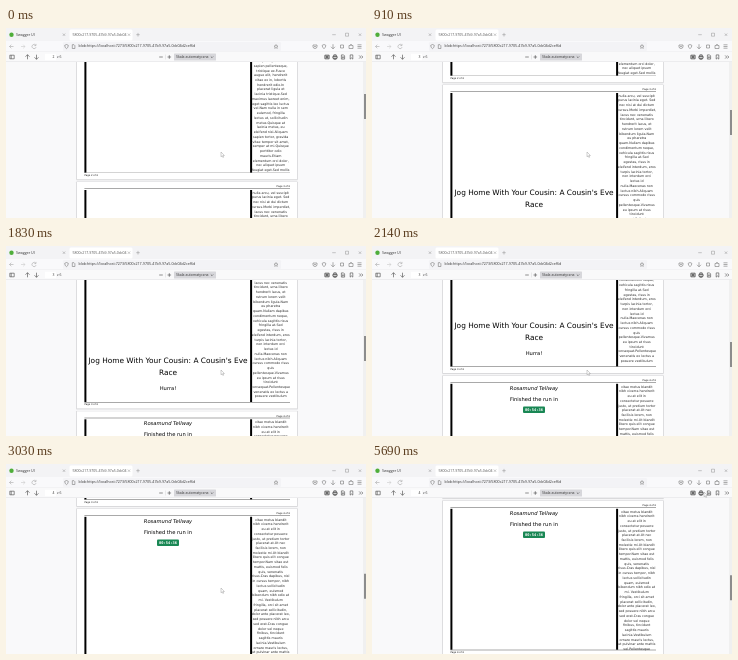
An HTML page with a canvas that plays this animation: 360x190 px, repeating every 5.79 s.

```html
<!DOCTYPE html>
<html lang="pl">
<head>
<meta charset="utf-8">
<title>PDF viewer</title>
<style>
html, body { margin: 0; width: 100%; height: 100%; overflow: hidden; background: #f9f9fb; }
canvas { display: block; width: 360px; height: 190px; }
</style>
</head>
<body>
<canvas id="stage"></canvas>
<script>
const W = 360, H = 190, LOOP = 5790, PAGE_H = 155.5, PITCH = 158.3;
const SANS = '"DejaVu Sans", sans-serif';
const UI = '"Open Sans", "Noto Sans", sans-serif';
const canvas = document.getElementById('stage');
const ctx = canvas.getContext('2d');
const ratio = window.devicePixelRatio || 1;
canvas.width = W * ratio;
canvas.height = H * ratio;

// Screen refreshes: [first, last, count]
const bursts = [
  [0, 0, 1], [50, 120, 2], [290, 410, 3], [640, 1050, 7], [1220, 1220, 1], [1420, 1420, 1],
  [1710, 1710, 1], [1830, 2140, 5], [2190, 2290, 3], [2470, 3030, 9], [3130, 3130, 1],
  [3330, 3400, 2], [3750, 4170, 6], [4390, 4960, 9], [5030, 5340, 5], [5690, 5690, 1]
];
const ticks = bursts.flatMap(([a, b, n]) =>
  Array.from({ length: n }, (_, i) => Math.round((a + (b - a) * i / Math.max(1, n - 1)) / 10) * 10));

// Rows: time, then the values at that time
const scrollKeys = [
  [0, 0], [50, 2], [120, 5], [570, 5], [910, 97], [1050, 112], [1640, 112], [1830, 147],
  [2140, 182.5], [2240, 192], [2400, 192], [3030, 267.5], [3130, 275.5]
];
const pointerKeys = [
  [0, 215, 124], [3680, 215, 124], [4170, 222, 80], [4320, 222, 80], [4960, 318, 43], [5340, 332, 28]
];

const sidebars = {
  2: `aliquam justo et|sapien pellentesque,|tristique ex.Fusce|augue elit, hendrerit|vitae ex in, lobortis|hendrerit odio.In|placerat ligula et|lacinia tristique.Sed|maximus laoreet enim,|eget sagittis leo luctus|vel.Nam nulla in sem|euismod, fringilla|lectus ut, sollicitudin|metus.Quisque at|lacinia metus, eu|eleifend nisl.Aliquam|sapien tortor, gravida|vitae tempor sit amet,|semper at mi.Quisque|porttitor odio|mauris.Etiam|elementum orci dolor,|nec aliquet ipsum|feugiat eget.Sed mollis`,
  3: `nulla arcu, vel suscipit|purus lacinia eget. Sed|nec nisi at dui dictum|cursus.Morbi imperdiet,|lacus nec venenatis|tincidunt, urna libero|hendrerit lacus, et|rutrum lorem velit|bibendum ligula.Nam|eu pharetra|quam.Nullam dapibus|condimentum neque,|vehicula sagittis risus|fringilla at.Sed|egestas, risus in|eleifend interdum, eros|turpis lacinia tortor,|non interdum orci|lectus id|nulla.Maecenas non|lectus nibh.Aliquam|cursus commodo risus|quis|pellentesque.Vivamus|eu ipsum at risus|tincidunt|consequat.Pellentesque|venenatis ex lectus a|posuere vestibulum`,
  4: `vitae metus blandit|nibh viverra hendrerit|eu at elit in|consectetur posuere|justo, ut pretium tortor|placerat at.Ut nec|facilisis lorem, non|molestie mi.Ut blandit|libero quis elit congue|tempor.Nam vitae est|mattis, euismod felis|quis, venenatis|risus.Cras dapibus, nisl|in cursus tempor, nibh|lectus sollicitudin|quam, euismod|bibendum nibh odio at|mi. Vestibulum|fringilla, orci sit amet|placerat sollicitudin,|dolor ante placerat leo,|sed posuere nibh arcu|sed erat.Cras congue|dolor vel neque|finibus, tincidunt|sagittis mauris|lacinia.Vestibulum|ornare mauris lectus,|ut pulvinar ante mattis|vel.Pellentesque`
};

function sample(keys, t) {
  const i = keys.findIndex(k => k[0] > t);
  if (i < 0) return keys[keys.length - 1].slice(1);
  const a = keys[i - 1], b = keys[i], p = (t - a[0]) / (b[0] - a[0]);
  return a.slice(1).map((v, j) => v + (b[j + 1] - v) * p);
}

function rect(x, y, w, h, fill, r = 0) {
  ctx.fillStyle = fill;
  ctx.beginPath();
  ctx.roundRect(x, y, w, h, r);
  ctx.fill();
}

function text(str, x, y, size, { align = 'left', color = '#333', style = '', font = UI } = {}) {
  ctx.font = `${style} ${size}px ${font}`;
  ctx.textAlign = align;
  ctx.textBaseline = 'middle';
  ctx.fillStyle = color;
  ctx.fillText(str, x, y);
}

function icon(path, x, y, color = '#777', width = 0.6) {
  ctx.save();
  ctx.translate(x, y);
  ctx.strokeStyle = color;
  ctx.lineWidth = width;
  ctx.stroke(new Path2D(path));
  ctx.restore();
}

const CROSS = 'M-1.2-1.2L1.2 1.2M1.2-1.2L-1.2 1.2';
const LEFT = 'M2 0H-2M-.2-1.8L-2 0L-.2 1.8';
const RIGHT = 'M-2 0H2M.2-1.8L2 0L.2 1.8';
const UP = 'M0 2.3V-2.3M-2-.3L0-2.3L2-.3';
const DOWN = 'M0-2.3V2.3M-2 .3L0 2.3L2 .3';
const PLUS = 'M-1.8 0H1.8M0-1.8V1.8';
const MINUS = 'M-1.8 0H1.8';
const BOX = 'M-1.5-1.5H1.5V1.5H-1.5Z';
const SHIELD = 'M0-2L1.8-1.2Q1.8 1.3 0 2.1Q-1.8 1.3-1.8-1.2Z';
const MENU = 'M-2-1.7H2M-2 0H2M-2 1.7H2';

function drawPage(n, y) {
  rect(70, y - 0.6, 222, PAGE_H + 1.8, '#e6e6e8', 0.8);
  rect(70.6, y - 0.3, 220.8, PAGE_H + 0.8, '#cfcfd2');
  rect(71, y, 220, PAGE_H, '#fff');
  rect(78.4, y + 8, 2, 141, '#000');
  rect(244.1, y + 8, 2, 141, '#000');
  rect(78.4, y + 6.5, 205.6, 0.4, '#555');
  rect(78.4, y + 149, 205.6, 0.4, '#555');

  const doc = { font: SANS, color: '#000' }, mid = { ...doc, align: 'center' };
  const label = `Page ${n} of 6`;
  text(label, 284, y + 4.7, 2.4, { ...doc, align: 'right' });
  text(label, 78.5, y + 151.5, 2.4, doc);

  const lines = sidebars[n].split('|');
  const first = n === 2 ? 146.5 - 4.74 * (lines.length - 1) : 10.9;
  lines.forEach((line, i) => text(line, 264.7, y + first + 4.74 * i, 3.25, { ...mid, color: '#222' }));

  if (n === 3) {
    text("Jog Home With Your Cousin: A Cousin's Eve", 162, y + 108.5, 7.4, mid);
    text('Race', 162, y + 120.4, 7.4, mid);
    text('Hurra!', 162, y + 136, 5.2, mid);
  }
  if (n === 4) {
    text('Rosamund Tellway', 162, y + 12.6, 5.2, { ...mid, style: 'italic' });
    text('Finished the run in', 162, y + 23.6, 5.2, mid);
    rect(151, y + 30.8, 22, 6.4, '#198754', 1);
    text('00:54:36', 162, y + 34.1, 3.7, { align: 'center', color: '#fff', style: 'bold', font: '"DejaVu Sans Mono", monospace' });
  }
}

function drawBrowser() {
  rect(0, 0, W, 13, '#f3f3f5');
  ctx.fillStyle = '#4fae3a';
  ctx.beginPath();
  ctx.arc(5.5, 6.7, 2.2, 0, 7);
  ctx.fill();
  text('Swagger UI', 10, 6.7, 3.6);
  icon(CROSS, 58, 6.7, '#777', 0.4);
  rect(63.5, 1.5, 63, 11, '#fff', 1.5);
  text('5800c217-9705-47b9-97a5-0dc04', 66.5, 6.7, 3.5, { color: '#555' });
  icon(CROSS, 123, 6.7, '#777', 0.4);
  icon(PLUS, 132, 6.7, '#777', 0.4);
  icon(MINUS, 328, 6.7, '#777', 0.4);
  icon(BOX, 341, 6.7, '#777', 0.4);
  icon(CROSS, 354, 6.7, '#777', 0.4);

  rect(0, 13, W, 11, '#f9f9fb');
  icon(LEFT, 5.5, 18.5, '#aaa');
  icon(RIGHT, 17, 18.5, '#ccc');
  icon('M1.8-1.2A2.1 2.1 0 1 0 2.1 .6M2-2.6V-.9H.3', 28, 18.5, '#aaa');
  rect(57, 14, 218, 9, '#f3f3f6', 1.2);
  icon(SHIELD, 60.5, 18.5);
  icon('M-1.2-1.8H.5L1.4-.8V2H-1.2Z', 67.5, 18.5);
  text('blob:https://localhost:7273/5800c217-9705-47b9-97a5-0dc04d2cef6d', 72.5, 18.5, 3.65);
  icon('M0-2L.6-.6L2-.5L.9 .4L1.3 1.9L0 1.1L-1.3 1.9L-.9 .4L-2-.5L-.6-.6Z', 270, 18.5, '#777', 0.5);
  icon('M-2-1.5H2V0A2 2 0 0 1-2 0ZM-1-.4L0 .5L1-.4', 309, 18.5);
  icon(SHIELD, 318, 18.5);
  icon(DOWN, 327, 18.5);
  icon(BOX, 336, 18.5);
  icon('M-2-1H-.5V-2H.5V-1H2V2H-2Z', 345, 18.5);
  icon(MENU, 353.5, 18.5);
}

function drawToolbar(page) {
  const dark = '#444';
  rect(0, 24, W, 10, '#f9f9fa');
  rect(0, 23.8, W, 0.3, '#dcdce0');
  rect(0, 33.7, W, 0.4, '#c4c4c8');
  icon('M-2.2-1.8H2.2V1.8H-2.2ZM-.8-1.8V1.8', 6, 29, dark);
  icon(UP, 21.5, 29, dark);
  icon(DOWN, 30.5, 29, dark);
  rect(39, 25.7, 11, 6.6, '#fff', 0.5);
  text(page, 48.5, 29, 3.4, { align: 'right' });
  text('z 6', 51, 29, 3.4);
  icon(MINUS, 155, 29, dark);
  rect(159, 26.5, 0.3, 5, '#c0c0c4');
  icon(PLUS, 163.3, 29, dark);
  rect(168, 25.4, 42, 7.2, '#d7d7db', 0.5);
  text('Skala automatyczna', 170, 29, 3.5);
  icon('M-1.2-.5L0 .7L1.2-.5', 206, 29, dark);
  icon('M-2.1-1.8H2.1V1.8H-2.1ZM-1-.6H1V.6H-1Z', 321, 29, dark, 0.8);
  icon('M-1.2-.6V-2.1H1.2V-.6M-2.1-.6H2.1V1.2H-2.1ZM-1.2 1.2V2.2H1.2V1.2', 329, 29, dark, 0.8);
  icon('M-1.6-2.1H.6L1.6-1.1V2.1H-1.6ZM0-1V1.2M-.8 .4L0 1.2L.8 .4', 337, 29, dark);
  icon('M-1.3-2.1H1.3V2.1L0 1L-1.3 2.1Z', 345.5, 29, dark);
  icon('M-1.8-1.5L-.3 0L-1.8 1.5M.3-1.5L1.8 0L.3 1.5', 355, 29, dark);
}

function drawPointer(x, y) {
  const arrow = new Path2D('M0 0V4.8L1.1 3.8L1.9 5.5L2.7 5.1L1.9 3.5H3.4Z');
  ctx.save();
  ctx.translate(x, y);
  ctx.fillStyle = '#fff';
  ctx.fill(arrow);
  ctx.strokeStyle = '#888';
  ctx.lineWidth = 0.4;
  ctx.stroke(arrow);
  ctx.restore();
}

function draw(now) {
  const time = now % LOOP;
  const t = ticks.filter(v => v <= time).pop();
  const [scroll] = sample(scrollKeys, t);
  ctx.setTransform(ratio, 0, 0, ratio, 0, 0);
  rect(0, 0, W, H, '#f9f9fa');
  const top = n => 154 - scroll + (n - 3) * PITCH;
  [2, 3, 4].forEach(n => drawPage(n, top(n)));
  rect(357, 34, 3, 156, '#f0f0f0');
  rect(358, 66 + scroll * 0.164, 2, 25, '#8c8c8c');
  drawBrowser();
  drawToolbar(scroll < 45 ? 2 : scroll < 203 ? 3 : 4);
  drawPointer(...sample(pointerKeys, t));
  requestAnimationFrame(draw);
}
requestAnimationFrame(draw);
</script>
</body>
</html>
```
